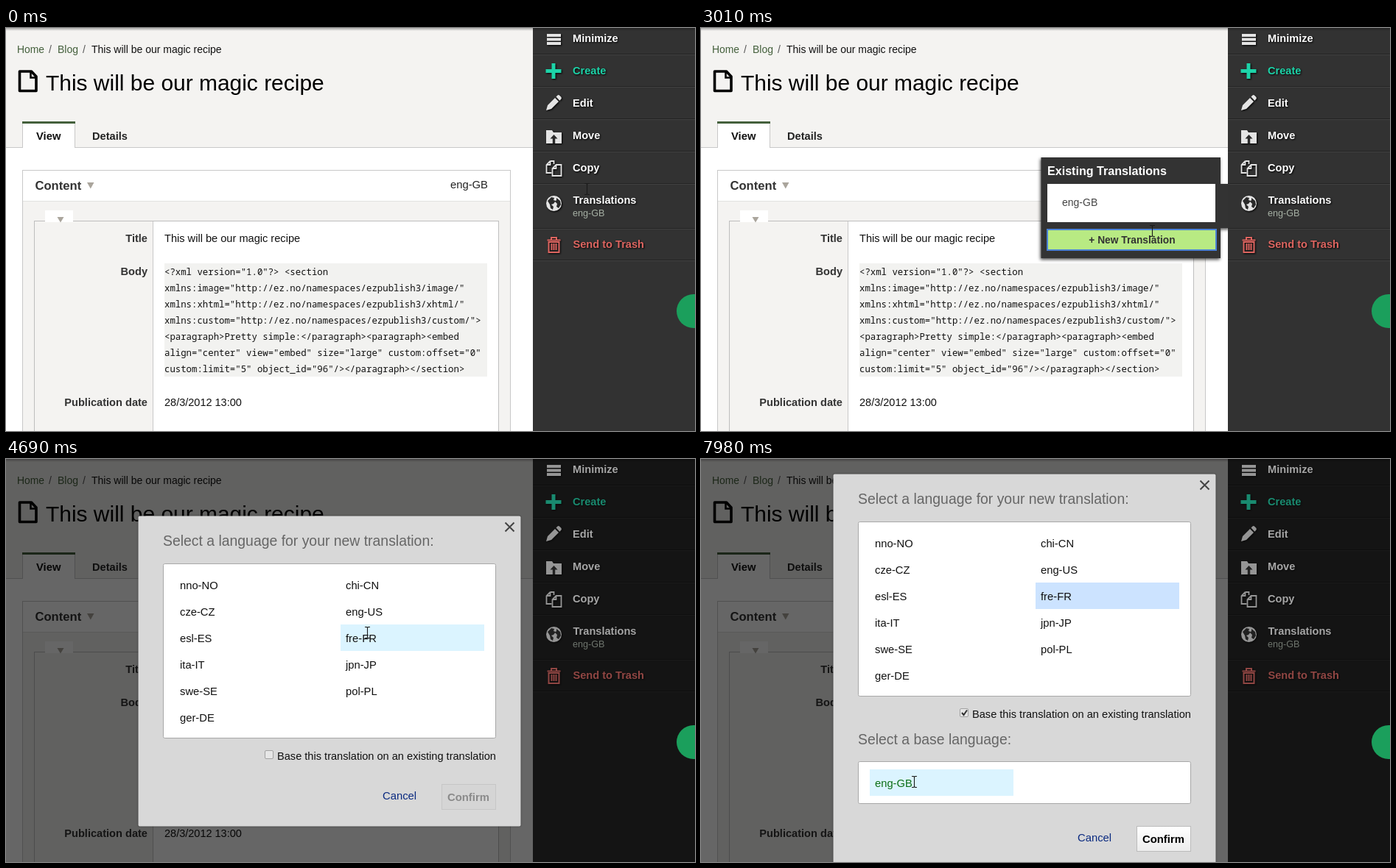
These frames come from a looping animation (935x548 px, 8 s). An HTML page:

```html
<!DOCTYPE html>
<html lang="en">
<head>
<meta charset="utf-8">
<title>New translation</title>
<style>
  html, body { margin: 0; width: 100%; height: 100%; overflow: hidden; background: #fff; }
  svg { display: block; position: absolute; left: 0; top: 0; font-family: "Liberation Sans", Arial, sans-serif; }
  .mono { font-family: "Noto Sans Mono", monospace; }
  .b { font-weight: bold; }
  .end { text-anchor: end; }
  .mid { text-anchor: middle; }
  #labels .b, #labels .icon { filter: drop-shadow(1px 1px 1px #000); }
  #pop { filter: drop-shadow(-1px 2px 2px rgba(0, 0, 0, .7)); }
  #panel { filter: drop-shadow(0 0 1px rgba(0, 0, 0, .5)); }
</style>
</head>
<body>
<svg id="stage" width="935" height="548" viewBox="0 0 935 548"></svg>
<script>
const LOOP = 8000, TICK = 70;
const GREY = '#f4f3f1', LINE = '#c8c8c8', HOVER = '#dbf4ff', PICKED = '#cce3ff';

const esc = s => s.replace(/&/g, '&amp;').replace(/</g, '&lt;').replace(/>/g, '&gt;');
const text = (s, x, y, size = 14.6, fill = '#111', cls = '', id = '') =>
  `<text x="${x}" y="${y}" font-size="${size}" fill="${fill}" class="${cls}" id="${id}">${esc(s)}</text>`;
const box = (x, y, w, h, fill, more = '') =>
  `<rect x="${x}" y="${y}" width="${w}" height="${h}" fill="${fill}" ${more}/>`;
const path = (d, fill = 'none', more = '') => `<path d="${d}" fill="${fill}" ${more}/>`;
const stroke = (color, w = 1) => `stroke="${color}" stroke-width="${w}"`;

function page() {
  const code = [
    '<?xml version="1.0"?> <section',
    'xmlns:image="http://ez.no/namespaces/ezpublish3/image/"',
    'xmlns:xhtml="http://ez.no/namespaces/ezpublish3/xhtml/"',
    'xmlns:custom="http://ez.no/namespaces/ezpublish3/custom/">',
    '<paragraph>Pretty simple:</paragraph><paragraph><embed',
    'align="center" view="embed" size="large" custom:offset="0"',
    'custom:limit="5" object_id="96"/></paragraph></section>'
  ];
  const name = 'This will be our magic recipe';
  return box(0, 0, 715, 548, '#fff') + box(0, 0, 715, 162, GREY) +
    text('Home', 15, 34, 13.9, '#44603c') + text('/', 58, 34, 14, '#555') +
    text('Blog', 70, 34, 14, '#44603c') + text('/', 104, 34, 14, '#555') +
    text(name, 116, 34, 14) +
    path('M18.5 59H34.5L41 66V85.5H18.5Z', 'none', stroke('#000', 3.6) + ' stroke-linejoin="round"') +
    path('M33.5 59V67.5H41', 'none', stroke('#000', 2.6)) +
    text(name, 54, 85, 29.95, '#000') +
    // tabs
    box(0, 162, 715, 1, LINE) +
    box(22, 127, 72, 36, LINE) + box(23, 130, 70, 33, '#fff') + box(22, 127, 72, 3, '#44603c') +
    text('View', 41, 152, 14.8, '#111', 'b') + text('Details', 117, 152, 14.6, '#222', 'b') +
    // content panel
    box(22.5, 193.5, 662, 400, GREY, stroke(LINE)) + box(23, 194, 661, 41, '#fff') + box(23, 235, 661, 1, '#e2e2e0') +
    text('Content', 39.5, 220, 16.6, '#333', 'b') + path('M110 210h9.5l-4.7 8.5z', '#aaa59c') +
    text('eng-GB', 603, 218, 14.8, '#222') +
    box(38.5, 262.5, 630, 400, '#fff', stroke('#bebebe')) + box(39, 263, 160, 300, GREY) + box(199, 263, 1, 300, LINE) +
    box(53, 248, 38, 16, '#fff') + path('M69.5 257h9l-4.5 7.5z', '#aaa59c') +
    text('Title', 192, 291, 14.6, '#333', 'b end') + text(name, 215, 291, 14.6) +
    text('Body', 192, 336, 14.6, '#333', 'b end') + box(215, 320, 438, 154, '#f2f2f0') +
    code.map((s, i) => text(s, 215, 336 + 22 * i, 12.35, '#111', 'mono')).join('') +
    text('Publication date', 192, 514, 14.6, '#333', 'b end') + text('28/3/2012 13:00', 215, 514, 14.5);
}

function popup() {
  return '<g id="pop">' + box(461.5, 176, 243.5, 137, '#333') + box(704, 212, 14, 60, '#333') +
    text('Existing Translations', 470, 200, 16.1, '#fff', 'b') +
    box(470, 212, 228, 52, '#fff', 'id="popItem"') + text('eng-GB', 490, 242, 14, '#444') +
    box(470, 274, 229, 28, '#b8ea83', 'id="newBtn" stroke-width="2"') +
    text('+ New Translation', 585, 293, 13.75, '#333', 'b mid') + '</g>';
}

function sidebar() {
  return box(715, 0, 220, 548, '#323232') +
    [35, 79, 123, 167, 211, 272, 315].map(y => box(715, y, 220, 1, '#232323') + box(715, y + 1, 220, 1, '#414141')).join('') +
    box(715.5, 211.5, 222, 60, 'none', 'id="focus" ' + stroke('#4c78c8'));
}

function labels() {
  const w = '#e4e4e4', red = '#dd6560', teal = '#1dd3a8';
  const items = [['Minimize', 19, '#fff'], ['Create', 63, teal], ['Edit', 107, '#fff'], ['Move', 151, '#fff'],
    ['Copy', 195, '#fff'], ['Translations', 239, '#fff'], ['Send to Trash', 299, red]];
  return '<g id="labels">' +
    items.map(([s, y, c]) => text(s, y < 200 ? 769 : 769.5, y, 14.6, c, 'b')).join('') +
    text('eng-GB', 769, 256, 12.6, '#a6b0a4') +
    '<g class="icon">' +
    [8, 13.5, 19].map(y => box(734, y, 19, 4, w)).join('') +
    path('M743 48v21M732.5 58.5h21', 'none', stroke(teal, 5)) +
    path('M733 112l2-7 10-10 5 5-10 10zM746.5 93.5l2-2q1.5-1 3 .5l1.8 1.8q1.2 1.5 0 3l-2 2z', w) +
    path('M733 139h8l2 3h11v15h-21z', w) + path('M743.5 145l5 5.5h-3.3v6.5h-3.4v-6.5h-3.3z', '#2a2a2a') +
    path('M738.5 181h5v4M738.5 181l-5 5v11h7M733.5 186h5v-5', 'none', stroke(w, 1.8)) +
    path('M746.5 186h7v15h-12v-10zM741.5 191h5v-5', 'none', stroke(w, 1.8)) +
    `<circle cx="743.5" cy="238.5" r="10.5" fill="${w}"/>` +
    path('M735 235l5-5 4 1-1 3 3 1-3 4-3 1 3 3-1 4-3-2-1-5zM747 231l5 4 1 5-3 5-3-2 1-4-3-3 2-2z', '#2a2a2a') +
    path('M734.5 288.5h18M740 288v-3h7v3M736.5 291v14h14v-14zM740.5 293v9M743.5 293v9M746.5 293v9', 'none', stroke(red, 2)) +
    '</g></g>';
}

// Language cells: six rows on the left, five on the right
const langs = ['nno-NO', 'cze-CZ', 'esl-ES', 'ita-IT', 'swe-SE', 'ger-DE', 'chi-CN', 'eng-US', 'fre-FR', 'jpn-JP', 'pol-PL'];
const cells = langs.map((s, i) => ({ s, x: i < 6 ? 229 : 454, y: 153 + 36 * (i % 6) }));
const CHOICE = langs.indexOf('fre-FR');
cells.push({ s: 'eng-GB', x: 229, y: 479 });
const BASE = cells.length - 1;

function dialog() {
  const cell = (c, i) => box(c.x, c.y, 195, 36, 'none', `id="cell${i}"`) +
    text(c.s, c.x + 7, c.y + 24, 14.75, '#111', '', 'lang' + i);
  const list = (y, h) => box(213.5, y + .5, 451, h, '#fff', 'rx="2" ' + stroke('#a8a8a8'));
  return '<g id="dialog">' + box(179.5, 77.5, 519, 422, '#d8d8d8', 'id="panel" rx="2"') +
    text('Select a language for your new translation:', 213, 118, 19.4, '#666') +
    path('M677.5 86.5l12 12M689.5 86.5l-12 12', 'none', stroke('#444', 2)) +
    list(142, 237) + cells.slice(0, BASE).map(cell).join('') +
    box(351.5, 396.5, 11, 11, '#e6e6e6', 'rx="1.5" ' + stroke('#a2a2a2')) +
    path('M354 402l2.5 3 4.5-6.5', 'none', 'id="tick" ' + stroke('#333', 2)) +
    text('Base this translation on an existing translation', 368, 409) +
    '<g id="base">' + text('Select a base language:', 213, 445, 19.4, '#666') + list(468, 57) + cell(cells[BASE], BASE) + '</g>' +
    '<g id="buttons">' + text('Cancel', 511, 463, 14.8, '#222', '', 'cancel') +
    box(591.5, 442.5, 73, 34, '#d5d5d5', stroke('#c6c6c6')) + text('Confirm', 599, 465, 14.85, '#8a8a8a', 'b') +
    '<g id="ready">' + box(591.5, 442.5, 73, 34, 'url(#sheen)', stroke('#bbb')) +
    text('Confirm', 599, 465, 14.85, '#000', 'b') + '</g></g></g>';
}

const fade = (id, a, b) => `<linearGradient id="${id}" x2="0" y2="1">` +
  `<stop stop-color="${a}"/><stop offset="1" stop-color="${b}"/></linearGradient>`;

document.getElementById('stage').innerHTML =
  '<defs>' + fade('sheen', '#fff', '#ececec') + fade('edge', 'rgba(0,0,0,.3)', 'rgba(0,0,0,0)') + '</defs>' +
  page() + popup() + sidebar() + box(0, 0, 935, 4, 'url(#edge)') +
  box(0, 0, 935, 548, '#000', 'id="mask"') + labels() + dialog() +
  '<circle cx="933" cy="385" r="23" fill="#1b9f5c"/>' +
  path('M-3.5-7.5h2.5l1 1 1-1h2.5M-3.5 7.5h2.5l1-1 1 1h2.5M0-7V7', 'none', 'id="cursor" ' + stroke('#1a1a1a', 1.1));

// Tracks: [time, value, ...]
const pointer = [
  [70, 788, 219], [280, 788, 227], [1960, 788, 227], [2100, 735, 243], [2240, 660, 262], [2380, 628, 275],
  [2520, 612, 276], [3780, 612, 276], [3850, 544, 272], [3990, 429, 259], [4060, 404, 252], [4130, 400, 243],
  [4270, 418, 227], [4410, 453, 218], [4480, 470, 227], [4620, 490, 234], [4690, 490, 236], [5670, 490, 236],
  [5810, 492, 255], [5950, 474, 312], [6160, 380, 385], [6300, 358, 394], [6510, 347, 398], [6580, 347, 400],
  [7420, 347, 400], [7560, 430, 445], [7630, 470, 462], [7700, 460, 456], [7840, 385, 433], [7910, 320, 440], [7980, 289, 439]
];
const slide = [[1330, 254], [1400, 150], [1470, 62], [1540, 16], [1610, 0]];
const drop = [[3080, -240], [3150, -58.5], [3220, -12], [3290, 0]];
const dim = [[3010, 0, 1], [3080, .36, .78], [3150, .6, .62]]; // mask, sidebar labels
const enable = [[5110, 0], [5390, 1]];

function at(track, t) {
  const i = track.findIndex(k => k[0] > t);
  if (i === 0) return track[0].slice(1);
  if (i < 0) return track[track.length - 1].slice(1);
  const a = track[i - 1], b = track[i], u = (t - a[0]) / (b[0] - a[0]);
  return a.slice(1).map((v, k) => v + (b[k + 1] - v) * u);
}

const set = (id, attrs) => {
  const el = document.getElementById(id);
  for (const k in attrs) el.setAttribute(k, attrs[k]);
};
const show = (id, on) => set(id, { display: on ? 'inline' : 'none' });
const move = (id, x, y) => set(id, { transform: `translate(${x} ${y})` });

function draw(time) {
  const t = Math.floor(time / TICK) * TICK;
  const [x, y] = at(pointer, t).map(Math.round);
  const open = t >= 3080, picked = t >= 5180, based = t >= 6930;
  const inside = (px, py, w, h) => x >= px && x < px + w && y >= py && y < py + h;

  move('cursor', x + .5, y);
  show('focus', t >= 1330 && t < 2870);
  show('pop', t >= 1400 && !open);
  move('pop', at(slide, t)[0], 0);
  set('popItem', { fill: inside(470, 212, 228, 52) ? HOVER : '#fff' });
  set('newBtn', { stroke: t >= 2870 ? '#4a82d6' : 'none' });

  const [mask, bright] = at(dim, t);
  set('mask', { opacity: mask });
  set('labels', { opacity: bright });
  show('dialog', open);
  const shift = based ? -57 : at(drop, t)[0];
  move('dialog', 0, shift);
  set('panel', { height: based ? 536 : 422 });
  cells.forEach((c, i) => {
    const over = t >= 3850 && inside(c.x, c.y + shift, 195, 36) && (i < BASE || based);
    set('cell' + i, { fill: picked && i === CHOICE ? PICKED : over ? HOVER : 'none' });
    if (i === BASE) set('lang' + i, { fill: over ? '#0b6e14' : '#111' });
  });
  show('tick', based);
  show('base', based);
  move('buttons', 0, based ? 114 : 0);
  set('cancel', { fill: t >= 3290 ? '#0a2a80' : '#222' });
  set('ready', { opacity: at(enable, t)[0] });
}

function loop() {
  draw(performance.now() % LOOP);
  requestAnimationFrame(loop);
}
loop();
</script>
</body>
</html>
```
